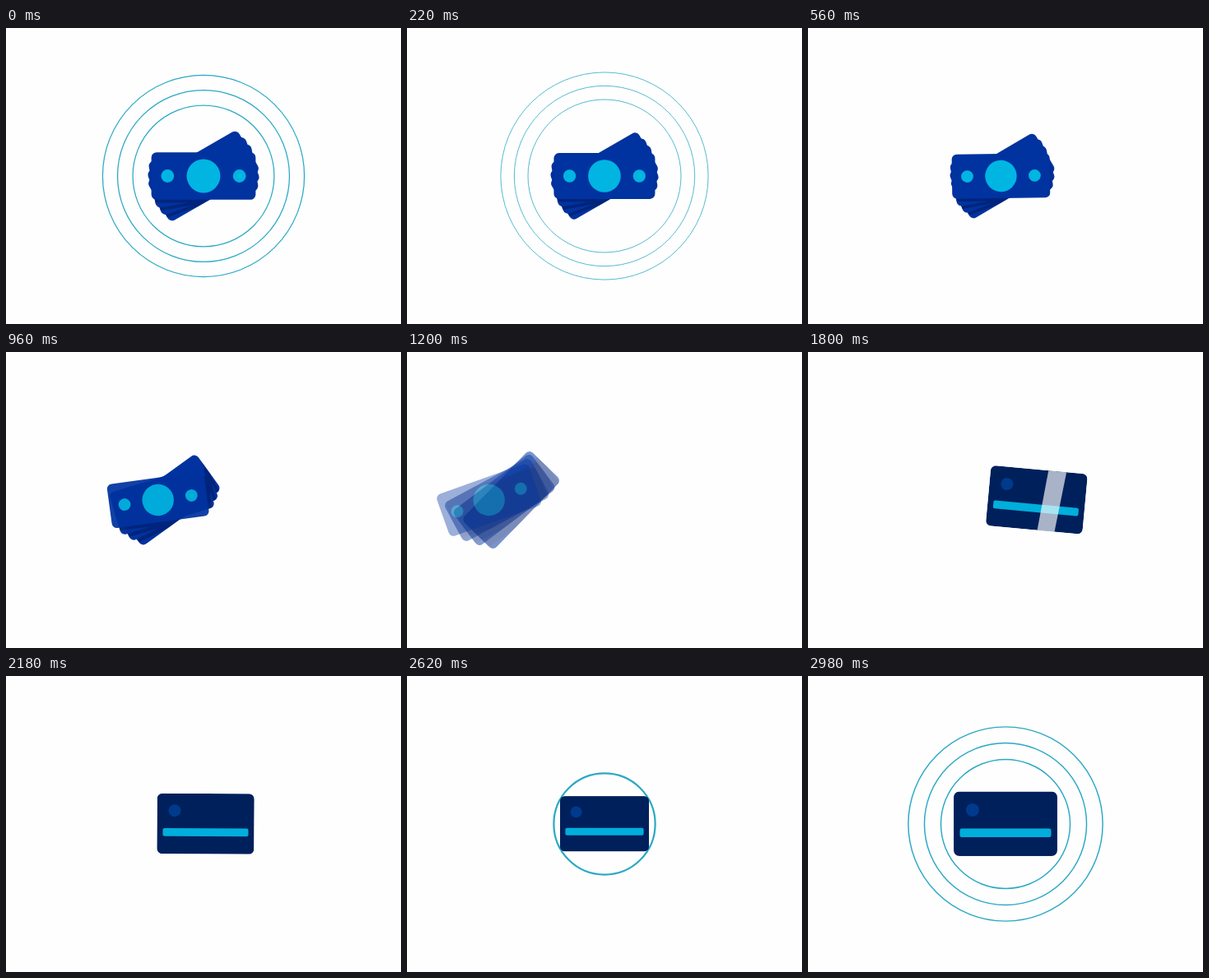
These frames come from a looping animation (480 by 360 pixels, 3000 ms). An HTML page:

```html
<!DOCTYPE html>
<html lang="en">
<head>
<meta charset="utf-8">
<title>Cash to card</title>
<style>
  html, body { margin: 0; width: 100%; height: 100%; overflow: hidden; background: #fefefe; }
  svg { display: block; width: 100%; height: 100%; }
</style>
</head>
<body>
<svg viewBox="0 0 480 360">
  <defs>
    <rect id="note" x="-59.5" y="-27" width="119" height="54" rx="6"/>
    <clipPath id="noteClip"><use href="#note"/></clipPath>
    <clipPath id="cardClip"><rect x="-59" y="-37" width="118" height="73.5" rx="6.5"/></clipPath>
  </defs>
  <g id="rings" fill="none" stroke="#2ba8c5"></g>
  <g id="cash"></g>
  <g id="card">
    <g clip-path="url(#cardClip)">
      <rect x="-59" y="-37" width="118" height="73.5" fill="#00205b"/>
      <circle cx="-37.6" cy="-16" r="7.5" fill="#003a8c"/>
      <rect x="-52" y="5.2" width="104" height="9.8" rx="2.2" fill="#00aedb"/>
      <path id="shine" d="M-7 -37H15L7 37H-14Z" fill="#fff" opacity=".66"/>
    </g>
  </g>
</svg>
<script>
const LOOP = 3000;
const TILT = 0.14; // degrees of lean per pixel of travel
const NOTES = 4;
const NOTE_LAG = 20;
const NOTE_FAN = -10;
const RINGS = 3;
const RING_SIZE = 126.5;
const RING_GAP = 16;
const RING_DELAY = 0.06;

const $ = id => document.getElementById(id);
const clamp = x => Math.min(1, Math.max(0, x));
const progress = (t, from, to) => clamp((t - from) / (to - from));
const mix = (a, b, p) => a + (b - a) * p;
const smooth = p => (1 - Math.cos(Math.PI * p)) / 2;
const quintOut = p => 1 - (1 - p) ** 5;

function add(parent, name, attrs = {}) {
  const el = document.createElementNS('http://www.w3.org/2000/svg', name);
  set(el, attrs);
  parent.appendChild(el);
  return el;
}

function set(el, attrs) {
  for (const key in attrs) el.setAttribute(key, attrs[key]);
}

function place(el, x, angle, scale, opacity) {
  set(el, {
    transform: `translate(${240 + x} 180) rotate(${angle}) scale(${scale})`,
    opacity,
    display: opacity > 0 ? 'inline' : 'none'
  });
}

function makeNote(isFront) {
  const note = add($('cash'), 'g');
  add(note, 'use', { href: '#note', fill: '#0033a0' });
  if (isFront) {
    for (const [cx, r] of [[-41, 7.4], [0, 19.2], [41, 7.4]]) {
      add(note, 'circle', { cx, r, fill: '#00b5e2' });
    }
  } else {
    // shadow cast by the note lying on top
    const clip = add(note, 'g', { 'clip-path': 'url(#noteClip)' });
    add(clip, 'use', {
      href: '#note', fill: '#00104a', opacity: 0.42,
      transform: `rotate(${-NOTE_FAN}) translate(0 3.5)`
    });
  }
  return note;
}

const notes = [];
for (let i = NOTES - 1; i >= 0; i--) notes[i] = makeNote(i === 0);
const rings = Array.from({ length: RINGS }, () => add($('rings'), 'circle', { cx: 240, cy: 180 }));

function drawCash(t) {
  const scale = mix(1.065, 1, smooth(progress(t, 0, 450)));
  notes.forEach((note, i) => {
    const time = t - i * NOTE_LAG;
    const x = -((Math.max(0, time - 46) * 0.00298) ** 4);
    const opacity = t < 1400 ? 1 - progress(time, 930, 1370) : 0;
    place(note, x, x * TILT + i * NOTE_FAN, scale, opacity);
  });
}

function drawCard(t) {
  const x = (Math.max(0, 2576 - t) * 0.0032) ** 4;
  const scale = t < 2500
    ? mix(1, 0.885, smooth(progress(t, 2260, 2500)))
    : mix(0.885, 1.067, smooth(progress(t, 2500, 2950)));
  place($('card'), x, x * TILT, scale, progress(t, 1376, 1576));
  const sweep = mix(-75, 75, progress(t, 1600, 1924));
  $('shine').setAttribute('transform', `translate(${sweep} 0)`);
}

function drawRings(t) {
  const age = t < 1500 ? progress(t, -600, 600) : progress(t, 2468, 3692);
  rings.forEach((ring, i) => {
    const delay = i * RING_DELAY;
    set(ring, {
      r: (RING_SIZE - i * RING_GAP) * quintOut(clamp(age - delay)),
      'stroke-width': 2.5 * (1 - age),
      display: age > delay && age < 0.95 ? 'inline' : 'none'
    });
  });
}

function draw(t) {
  drawRings(t);
  drawCash(t);
  drawCard(t);
}

const start = performance.now();
function frame() {
  draw((performance.now() - start) % LOOP);
  requestAnimationFrame(frame);
}
frame();
</script>
</body>
</html>
```
